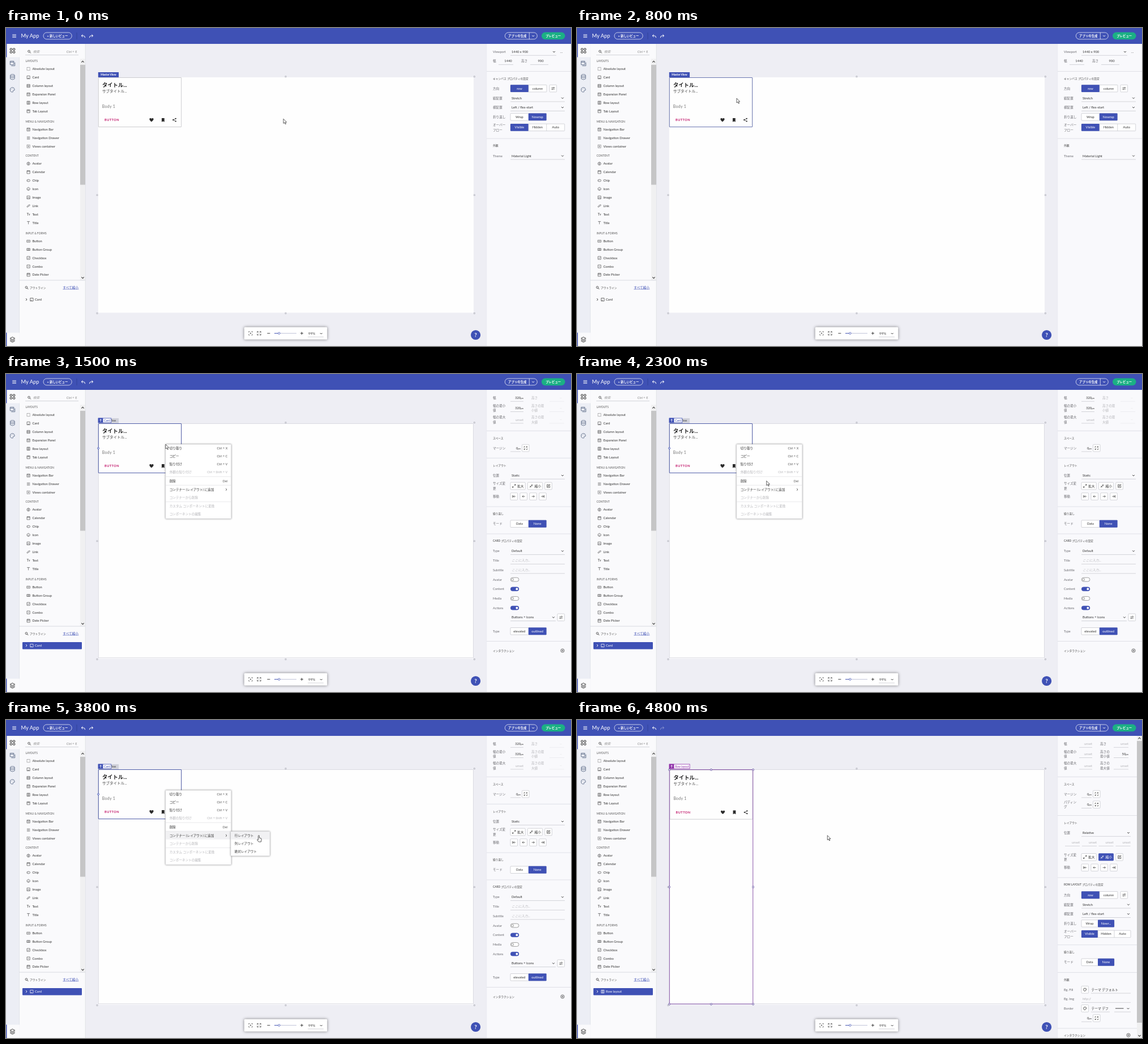
Recreate the animation shown at these times as an HTML page. Size 998x561 px, loop 6.1 s.

```html
<!DOCTYPE html>
<html lang="ja">
<head>
<meta charset="utf-8">
<title>App builder</title>
<style>
html, body { margin: 0; width: 100%; height: 100%; overflow: hidden; background: #eeeef4; }
svg { display: block; width: 998px; height: 561px; }
text { font-family: Lato, "Noto Sans CJK JP", "Noto Sans CJK", sans-serif; white-space: pre; }
.shadow { filter: drop-shadow(0 .6px 1.4px rgba(0, 0, 0, .42)); }
.shadow.wide { filter: drop-shadow(0 .8px 2.4px rgba(0, 0, 0, .5)); }
</style>
</head>
<body>
<svg id="stage" viewBox="0 0 998 561"></svg>
<script>
const LOOP = 6100;
const BLUE = '#3f51b5', INK = '#333', LABEL = '#6b6b70', PALE = '#b4b4b8', LINE = '#b9bac2';
const PURPLE = '#9031aa', FRAME_BLUE = '#4453a6', FRAME_PURPLE = '#7b419f';
const ROUND = 'M3 .3a2.7 2.7 0 1 1-.01 0z', BOX = 'M.4.4h5.2v5.2H.4z';

// Drawing helpers, all returning SVG markup
const text = (x, y, s, fill = INK, size = 5.75, more = '') =>
  `<text x="${x}" y="${y + size * .36}" fill="${fill}" font-size="${size}" ${more}>${s}</text>`;
const mid = (x, y, s, fill, size, more = '') => text(x, y, s, fill, size, 'text-anchor="middle" ' + more);
const end = (x, y, s, fill, size, more = '') => text(x, y, s, fill, size, 'text-anchor="end" ' + more);
const rect = (x, y, w, h, fill = 'none', stroke = 'none', r = 0, sw = .7) =>
  `<rect x="${x}" y="${y}" width="${w}" height="${h}" fill="${fill}" stroke="${stroke}" stroke-width="${sw}" rx="${r}"/>`;
const dot = (x, y, r, fill, stroke = 'none', sw = .8) =>
  `<circle cx="${x}" cy="${y}" r="${r}" fill="${fill}" stroke="${stroke}" stroke-width="${sw}"/>`;
const path = (d, stroke = INK, sw = .7, fill = 'none', dash = 'none') =>
  `<path d="${d}" fill="${fill}" stroke="${stroke}" stroke-width="${sw}" stroke-dasharray="${dash}"/>`;
const at = (x, y, s) => `<g transform="translate(${x} ${y})">${s}</g>`;
const hline = (x1, x2, y, c = LINE, sw = .6) => path(`M${x1} ${y}H${x2}`, c, sw);
const chevron = (x, y, c = INK) => path(`M${x - 1.9} ${y - 1}l1.9 2 1.9-2`, c, .9);
const caret = (x, y, up) => path(`M${x - 2.2} ${y + 1.2 * up}l2.2 ${-2.4 * up} 2.2 ${2.4 * up}`, '#444', 1.1);
const bold = 'font-weight="700"', medium = 'font-weight="500"', italic = 'font-style="italic"';

const magnifier = (x, y) => dot(x - .5, y - .5, 1.8, 'none', INK, .8) + path(`M${x + .8} ${y + .8}l2 2`, INK, 1);
const rule = y => hline(849, 998, y, '#d9dae1', .8);
const heading = (y, s) => text(860, y, s, '#444', 4.75, medium);
const lines = (x, y, rows, c = LABEL) =>
  rows.map((s, i) => text(x, y + (i - (rows.length - 1) / 2) * 8.5, s, c, 5.6)).join('');
const label = (y, ...rows) => lines(860, y, rows);
const select = (y, s, x2 = 987, x1 = 891) => text(x1 + 2, y, s) + chevron(x2 - 4, y) + hline(x1, x2, y + 6.3);
const hint = (y, s, x2 = 987) => text(893, y, s, PALE, 5.75, italic) + hline(891, x2, y + 6.3);
const segments = (y, w, active, ...names) => rect(891, y - 6.2, w * names.length, 12.5, '#fff', LINE, 1, .6) +
  names.map((s, i) => {
    const on = i === active, x = 891 + i * w;
    return (on ? rect(x, y - 6.4, w, 12.9, BLUE, 'none', 1) : i ? path(`M${x} ${y - 6.2}v12.5`, LINE, .6) : '') +
      mid(x + w / 2, y, s, on ? '#fff' : INK);
  }).join('');
const button = (x, y, icon, w = 12.6, on = false, s = '') =>
  rect(x, y - 6.3, w, 12.6, on ? BLUE : '#fff', on ? BLUE : LINE, 1.2, .6) +
  at(x + 6.3, y, path(icon, on ? '#fff' : INK, .75)) + text(x + 12, y, s, on ? '#fff' : INK);
const toggle = (y, on) => rect(891.3, y - 3.4, 14.6, 6.8, on ? BLUE : '#fff', on ? BLUE : '#777', 3.4) +
  (on ? dot(902.4, y, 2, '#fff') : dot(894.8, y, 1.9, '#fff', '#777', .7));
const value = (x, y, s, w = 23) => (s === 'unset' ? end(x, y, s, PALE)
  : end(x, y, `${s}<tspan font-size="4.6">px</tspan>`)) + hline(x - w, x, y + 6.3);

const SWAP = 'M-2.7-1.2h5.2l-1.5-1.5M2.7 1.2h-5.2l1.5 1.5';
const UNLINK = 'M-1-2.6h-1.6v1.8M1 2.6h1.6V.8M-2.6 2.6l1.8-1.8M2.6-2.6L.8-.8M-2.6 1v1.6h1.6M1-2.6h1.6v1.6';
const EDIT = 'M.4-2.4h-2.8v5h5V0M-.8.9l.2-1.2 2.8-2.6.8.9L.2.7z';
const GROW = 'M.8-2.6h1.9v1.9M2.6-2.6L.5-.5M-.8 2.6h-1.9V.7M-2.6 2.6l2.1-2.1';
const SHRINK = 'M.5-2.4v1.9h1.9M.5-.5l2.2-2.2M-.5 2.4V.5h-1.9M-.5.5l-2.2 2.2';
const PALETTE = 'M0-2.7a2.7 2.7 0 1 0 0 5.4q1 0 .7-1t.7-1.1h1q.4-3.3-2.4-3.3M-1.4-.6h.4M.3-1.5h.4';
const MOVES = ['M-2.6-2.2v4.4M2.6 0h-4M.2-1.7L-1.5 0 .2 1.7', 'M2.4 0h-4.6M-.5-1.7L-2.2 0l1.7 1.7',
  'M-2.4 0h4.6M.5-1.7L2.2 0 .5 1.7', 'M2.6-2.2v4.4M-2.6 0h4M-.2-1.7L1.5 0l-1.7 1.7'];
const moves = y => label(y, '移動') + MOVES.map((d, i) => button(891 + i * 16.9, y, d)).join('');
const sizing = (y, shrunk) => label(y, 'サイズ変', '更') + button(891, y, GROW, 26.3, false, '拡大') +
  button(921.4, y, SHRINK, 26.3, shrunk, '縮小') + button(951.8, y, EDIT);
const adder = (x, y) => dot(x, y, 3.1, 'none', INK, .7) + path(`M${x - 1.7} ${y}h3.4m-1.7-1.7v3.4`);

// Toolbox: name, y, icon, dash
const ROWBOX = BOX + 'M2.2.4v5.2M3.8.4v5.2';
const tools = [
  ['LAYOUTS', 58.5],
  ['Absolute layout', 72, BOX, '.9 .7'], ['Card', 87, BOX + 'M1.5 4.4h3'],
  ['Column layout', 102, BOX + 'M.4 2.2h5.2M.4 3.8h5.2'], ['Expansion Panel', 117, BOX + 'M.4 2h5.2M2 3.4l1 1 1-1'],
  ['Row layout', 131.7, ROWBOX], ['Tab Layout', 146.7, BOX + 'M.4 2.2h5.2M3 .4v1.8'],
  ['MENU &amp; NAVIGATION', 165.5],
  ['Navigation Bar', 179, BOX + 'M.4 1.9h5.2M2 3.8h2.4'], ['Navigation Drawer', 194, 'M.3 1h5.4M.3 3h5.4M.3 5h5.4'],
  ['Views container', 208.7, BOX + 'M1.6 3h2.8M3 1.6v2.8', '1.2 .5'],
  ['CONTENT', 225.7],
  ['Avatar', 239.2, ROUND + 'M3 1.5a.9.9 0 1 1-.01 0M1.3 4.8q1.7-1.6 3.4 0'], ['Calendar', 254.2, BOX + 'M.4 1.8h5.2M1.8 0v1M4.2 0v1'],
  ['Chip', 269, 'M2 1.2h2a1.8 1.8 0 0 1 0 3.6H2a1.8 1.8 0 0 1 0-3.6M1.5 3h1.2'], ['Icon', 283.8, ROUND + 'M1.6 3.5q1.4 1.8 2.8 0M2 2.1v.5M4 2.1v.5'],
  ['Image', 298.8, BOX + 'M.9 4.6l1.4-1.8 1 1.1.8-.9 1.1 1.6'],
  ['Link', 313.7, 'M2.7 3.8L1.9 4.9Q1 5.6.5 4.9q-.5-.8.4-1.5l1.3-1.2q.8-.6 1.4.2M3.3 2.2L4.1 1.1Q5 .4 5.5 1.1q.5.8-.4 1.5L3.8 3.8q-.8.6-1.4-.2'],
  ['Text', 328.6, 'M.2 1h3.2M1.8 1v4.2M3.6 2.7h2.2M4.7 2.7v2.5'], ['Title', 343.6, 'M.5.7h5M3 .7v4.8'],
  ['INPUT &amp; FORMS', 362.5],
  ['Button', 376, 'M.2 1.2h5.6v3.6H.2zM1.7 3h2.6'], ['Button Group', 390.6, 'M.2 1.2h5.6v3.6H.2zM2.2 1.2v3.6M4 1.2v3.6'],
  ['Checkbox', 405.5, BOX + 'M1.5 3l1.1 1.1 2-2.2'], ['Combo', 420.5, BOX + 'M2 2.5l1 1 1-1'],
  ['Date Picker', 435.3, BOX + 'M.4 1.9h5.2M1.8 0v1M4.2 0v1M1.8 3.6h1.2']
].map(([s, y, d, dash]) => d ? at(36.6, y - 2.9, path(d, '#444', .65, 'none', dash)) + text(46.4, y, s)
  : text(34.5, y, s, '#555', 4.9)).join('');

const sidebar = rect(0, 28, 23.5, 533, '#eceef5') + rect(23.5, 28, 116.5, 533, '#fafafc') +
  rect(0, 28, 23.5, 23.5, '#fafafc') + rect(0, 28, 1.4, 23.5, BLUE) +
  rect(0, 537.5, 23.5, 23.5, '#fafafc') + rect(0, 537.5, 1.4, 23.5, BLUE) +
  path('M23.5 51.5v486M140.2 28v533', '#d6d8e0', .6) +
  at(11.5, 40, [[-2.6, -2.4], [2.6, -2.4], [-2.6, 2.6], [2.6, 2.6]].map(([x, y]) => rect(x - 1.6, y - 1.6, 3.2, 3.2, 'none', '#222', .8, 1)).join('')) +
  path('M7.3 58.5h6.5v6.3H7.3zM9.3 66.7h6.4v-6M7.3 60.4h6.5', '#5c6a86', .9) +
  path('M7.6 83.4a3.8 1.6 0 1 1 7.6 0a3.8 1.6 0 1 1-7.6 0v6.2q3.8 3 7.6 0v-6.2M7.6 86.5q3.8 3 7.6 0', '#5c6a86', .9) +
  at(11.4, 109, `<g transform="scale(1.5)">${path(PALETTE, '#5c6a86', .6)}</g>`) +
  path('M11.4 545.2l4.3 2.3-4.3 2.3-4.3-2.3zM7.1 549.8l4.3 2.3 4.3-2.3M7.1 552l4.3 2.3 4.3-2.3', '#222', .9) +
  magnifier(41, 41.6) + text(47.8, 42, '検索', '#999', 5.75, italic) + end(125.5, 42, 'Ctrl + E', '#888') +
  hline(34, 128, 47.6) + tools +
  rect(131, 54.5, 9, 390.5, '#f0f0f1') + rect(131, 65, 9, 211.5, '#c5c5c6') + caret(135.5, 59.5, 1) + caret(135.5, 440.5, -1) +
  hline(23.5, 140, 445, '#d0d2da', .8) +
  magnifier(36.4, 458) + text(42, 458.4, 'アウトライン', '#444', 4.75, medium) +
  text(100.3, 457.6, 'すべて縮小', BLUE, 5.65) + hline(100.3, 128.5, 460.8, BLUE);

const header = rect(0, 0, 998, 28, BLUE) + path('M11.2 11.8h6.8M11.2 14.1h6.8M11.2 16.4h6.8', '#fff', .9) +
  text(26.6, 14, 'My App', '#fff', 9.3) + rect(66, 8, 50.2, 11.8, 'none', '#fff', 5.9) +
  mid(91, 14, '+ 新しいビュー', '#fff', 5.4, bold) + path('M125 8v12', '#2f3f95', .8) +
  path('M135.6 11.5l-2.4 2.2 2.4 2.2M133.4 13.7h3.4q2.6 0 2.8 3.5', '#fff', 1) +
  rect(881.3, 8, 57, 11.8, 'none', '#fff', 5.9) + path('M924.3 8v12', '#fff', .7) + chevron(931.2, 14, '#fff') +
  mid(903.3, 14, 'アプリの生成', '#fff', 5.4, bold) + rect(946, 7.6, 41.5, 12.6, '#1bb084', 'none', 6.3) +
  mid(966.7, 14, 'プレビュー', '#fff', 5.4, bold);
const redo = c => path('M151.4 11.5l2.4 2.2-2.4 2.2M153.6 13.7h-3.4q-2.6 0-2.8 3.5', c, 1);

const canvas = rect(162.8, 87, 663.2, 415.3, '#fefefe') +
  [[494, 85.8], [827.5, 85.8], [161, 294.8], [827.5, 294.8], [161, 503.2], [494, 503.2], [827.5, 503.2]]
    .map(([x, y]) => rect(x - 1, y - 1, 2, 2, '#fff', '#9a9ca8', 0, .6)).join('');

const toolbar = `<g class="shadow wide">${rect(420.8, 527.8, 146.5, 21.8, '#fff', 'none', 1.5)}</g>` +
  at(432, 538.6, path('M-3.2-1.5v-1.7h1.7M1.5-3.2h1.7v1.7M3.2 1.5v1.7H1.5M-1.5 3.2h-1.7V1.5M-1.3 0h2.6M0-1.3v2.6', '#444')) +
  at(447, 538.6, path('M-3.2-.9v-2.3h2.3M.9-3.2h2.3v2.3M3.2.9v2.3H.9M-.9 3.2h-2.3V.9M-3-3l2 2M3-3l-2 2M3 3L1 1M-3 3l2-2', '#444')) +
  path('M461.4 538.6h5M520 538.6h5M522.5 536.1v5', INK, .9) + hline(474, 513, 538.6, '#b9bdd4', .9) +
  hline(474, 481, 538.6, BLUE, .9) + dot(482.4, 538.6, 1.7, '#fff', BLUE) +
  text(534, 538.8, '99%', INK, 6.3) + hline(533, 561, 545) + chevron(556.7, 539) +
  dot(829.6, 541.5, 8.6, BLUE) + mid(829.6, 541.5, '?', '#fff', 10, bold);

const card = text(170, 101, 'タイトル...', '#222', 9.3, bold) + text(170, 111.7, 'サブタイトル...', '#444', 6.5) +
  text(169.8, 138, 'Body 1', '#777', 7, 'letter-spacing=".25"') +
  text(174, 162.4, 'BUTTON', '#c2186b', 5.6, 'font-weight="700" letter-spacing=".45"') +
  at(257, 162.2, path('M0 3.3C-5.4-.9-3.6-3.1-1.9-3.1Q-.6-3.1 0-1.9Q.6-3.1 1.9-3.1C3.6-3.1 5.4-.9 0 3.3z', 'none', 0, '#2c2c2c')) +
  path('M275 159h4.8v6.7l-2.4-1.2-2.4 1.2z', 'none', 0, '#2c2c2c') +
  at(297.5, 162.2, path('M2.3-2.4L-2.3 0l4.6 2.4', '#2c2c2c', .8) + dot(2.3, -2.4, 1.1, '#2c2c2c') + dot(-2.3, 0, 1.1, '#2c2c2c') + dot(2.3, 2.4, 1.1, '#2c2c2c'));
const cardEdge = (stroke, sw = .7) => rect(163.3, 87.5, 146.4, 87, 'none', stroke, .5, sw);
const handle = (x, y, c) => dot(x, y, 1.5, '#fff', c, .9);
const viewTag = (fill, ink, more) => rect(162.8, 78, 36.3, 9, fill) + mid(180.9, 82.7, 'Master View', ink, 4.9, more);
const tag = (s, w, c) => rect(163.1, 78, w, 7.8, '#fff', c, 0, .8) + rect(162.8, 77.7, 8.6, 8.4, c) +
  path('M167.1 84.2v-4.4M165.5 81.3l1.6-1.6 1.6 1.6', '#fff', .9) + text(173.3, 82, s, c, 5);
const outline = (s, icon, on) => {
  const c = on ? '#fff' : INK;
  return (on ? rect(29, 472.9, 105, 12.7, BLUE, 'none', 1) : '') + path('M35 477l2 2-2 2', c, .9) +
    at(42.4, 476.1, path(icon, c, .7)) + text(51, 479.2, s, c);
};
const CARDBOX = BOX + 'M1.5 4.4h1.4';

// Property panels
const panel = s => rect(848.6, 28, 149.4, 533, '#f9f9fc') + path('M848.6 28v533', '#e0e1e8', .5) + s;
const flexRows = (y, x2, w2, w3, nowrap) => label(y, '方向') + segments(y, 32, 0, 'row', 'column') + button(960, y, SWAP) +
  label(y + 17, '縦配置') + select(y + 17, 'Stretch', x2) + label(y + 33.5, '横配置') + select(y + 33.5, 'Left / flex-start', x2) +
  label(y + 50.2, '折り返し') + segments(y + 50.2, w2, 1, 'Wrap', nowrap) +
  label(y + 68.7, 'オーバー', 'フロー') + segments(y + 68.7, w3, 0, 'Visible', 'Hidden', 'Auto');
const sizeYs = [42, 60.2, 80.6];
const sizeRows = [['幅'], ['幅の最小', '値'], ['幅の最大', '値']].map((rows, i) => label(sizeYs[i], ...rows)).join('');
const heights = (x, c, ...cells) => cells.map((rows, i) => lines(x, sizeYs[i], rows, c)).join('');

const rootPanel = panel(label(42, 'Viewport') + select(42, '1440 x 900', 972) + mid(981, 41, '...', '#888', 7) +
  label(58.3, '幅') + mid(887, 58.3, '1440') + hline(870, 896, 64.6) + text(910, 58.3, '高さ', LABEL, 5.6) + mid(944.5, 58.3, '900') +
  hline(926, 958, 64.6) + rule(76.5) + heading(89.3, 'キャンバス プロパティの設定') +
  flexRows(106.6, 987, 31.8, 31.9, 'Nowrap') + rule(195) + heading(207.7, '外観') + label(225.6, 'Theme') + select(225.6, 'Material Light'));

const cardPanel = panel(sizeRows + value(914, 42, '320') + value(914, 60.2, '320') + value(914, 80.6, 'unset') +
  heights(928, PALE, ['高さ'], ['高さの最', '小値'], ['高さの最', '大値']) +
  sizeYs.map(y => end(982, y, '—', '#ddd', 5) + hline(960, 986, y + 6.3, '#e4e4ea')).join('') +
  rule(100.3) + heading(113, 'スペース') + label(130.6, 'マージン') + value(909, 130.6, '0', 18) + button(911.5, 130.6, UNLINK) +
  rule(148.3) + heading(161, 'レイアウト') + label(179, '位置') + select(179, 'Static') + sizing(197.5, false) + moves(216) +
  rule(234) + heading(246.7, '繰り返し') + label(264.2, 'モード') + segments(264.2, 31.8, 1, 'Data', 'None') +
  rule(282) + heading(294.5, 'CARD プロパティの設定') + label(312.3, 'Type') + select(312.3, 'Default') +
  label(329, 'Title') + hint(329, 'ここに入力...') + label(345.6, 'Subtitle') + hint(345.6, 'ここに入力...') +
  ['Avatar', 'Content', 'Media', 'Actions'].map((s, i) => label(362.6 + i * 16.7, s) + toggle(362.6 + i * 16.7, i % 2)).join('') +
  select(429.3, 'Buttons + Icons', 971) + button(974, 429.3, SWAP) + label(453.7, 'Type') + segments(453.7, 31.8, 1, 'elevated', 'outlined') +
  rule(471.5) + heading(488, 'インタラクション') + adder(983, 488));

const rowPanel = panel(sizeRows + sizeYs.map((y, i) => value(910, y, 'unset') + value(974, y, i === 1 ? '50' : 'unset', 26)).join('') +
  heights(924, LABEL, ['高さ'], ['高さの', '最小値'], ['高さの', '最大値']) +
  rule(100.3) + heading(113, 'スペース') + label(130.6, 'マージン') + label(149.2, 'パディン', 'グ') +
  [130.6, 149.2, 526].map(y => value(909, y, '0', 18) + button(911.5, y, UNLINK)).join('') +
  rule(168.5) + heading(181.6, 'レイアウト') + label(199, '位置') + select(199, 'Relative', 978) +
  [888, 918, 947.5, 977.5].map(x => value(x, 216, 'unset', 26)).join('') + sizing(241.8, true) + moves(260.3) +
  rule(278) + heading(290.7, 'ROW LAYOUT プロパティの設定') + flexRows(308.7, 978, 29, 29, 'Nowr...') +
  rule(396.7) + heading(409.6, '繰り返し') + label(427.2, 'モード') + segments(427.2, 29, 1, 'Data', 'None') +
  rule(445.4) + heading(458, '外観') + label(475.7, 'Bg. Fill') + button(891, 475.7, PALETTE) + text(908.5, 475.7, 'テーマ デフォルト') + hline(908, 978, 482) +
  label(492, 'Bg. Img') + hint(492, 'http://', 978) + label(508.8, 'Border') + button(891, 508.8, PALETTE) + text(908.5, 508.8, 'テーマ デフ') +
  hline(908, 941, 515) + hline(951, 965.5, 508.8, INK, .9) + chevron(973.5, 509) + hline(949, 978, 515) +
  rule(544) + heading(556, 'インタラクション') + adder(974, 556) +
  rect(989, 28, 9, 533, '#f0f0f1') + rect(989, 37, 9, 497, '#c5c5c6') + caret(993.5, 32.3, 1) + caret(993.5, 557, -1));

// Context menus
const menuText = (x, y, s, off) => text(x, y, s, off ? PALE : INK, 5.6);
const popup = (x, y, w, h) => `<g class="shadow">${rect(x, y, w, h, '#fff', '#c9c9cf', .8, .5)}</g>`;
const menu = [[131.2, '切り取り', 'Ctrl + X'], [145.2, 'コピー', 'Ctrl + C'], [159.3, '貼り付け', 'Ctrl + V'],
  [173.3, '外観の貼り付け', 'Ctrl + Shift + V', 1], [188.6, '削除', 'Del'], [203.7, 'コンテナー (レイアウト) に追加', ''],
  [217.6, 'コンテナーから削除', '', 1], [233.1, 'カスタム コンポーネントに変換', '', 1], [247.1, 'コンポーネントの編集', '', 1]]
  .map(([y, s, key, off]) => menuText(288.7, y, s, off) + end(391.3, y, key, off ? PALE : '#555', 5.6)).join('') +
  [181, 196.2, 225.4].map(y => hline(282, 397.5, y, '#d8d8dd')).join('') + path('M388.2 202l1.8 1.8-1.8 1.8', INK, .9);
const subItems = ['行レイアウト', '列レイアウト', '絶対レイアウト'].map((s, i) => menuText(403.8, 203.7 + i * 14, s)).join('');

// Layers appear only inside their [from, to) spans
const stage = document.getElementById('stage');
const layers = [];
let markup = '';
const layer = (s, ...spans) => { layers.push(spans); markup += `<g class="layer">${s}</g>`; };

layer(canvas + header + sidebar + toolbar, 0, LOOP);
layer(redo('#fff'), 0, 4500);
layer(redo('#8792d0'), 4500, LOOP);
layer(rect(163.2, 87.7, 662.2, 413.1, 'none', '#c3c4cf', 0, .6), 1500, 4500, 4600, LOOP);
layer(viewTag(BLUE, '#fff', bold), 0, 1400);
layer(viewTag('#d0d1da', '#444'), 1400, 4600);
layer(card + cardEdge('#b8b8bc'), 0, 4500);
layer(cardEdge(FRAME_BLUE), 600, 1500);
layer(cardEdge(FRAME_BLUE, .9) + tag('Card', 22.6, BLUE) + handle(163.1, 131, BLUE), 1500, 4500);
layer(at(.6, .6, card + cardEdge('#b8b8bc')), 4500, LOOP);
layer(rect(163.3, 87.6, 147.2, 413, 'none', '#a9a9b0', 0, .8), 4500, 4600);
layer(tag('Row layout', 36, PURPLE) + rect(163.3, 87.6, 147.5, 413.4, 'none', FRAME_PURPLE, 0, .9) +
  [163.1, 237, 311.1].map(x => [87.7, 294.6, 501.3].map(y => x === 237 && y === 294.6 ? '' : handle(x, y, '#5d4a9c')).join('')).join(''), 4600, LOOP);
layer(outline('Card', CARDBOX, false), 0, 1400);
layer(outline('Card', CARDBOX, true), 1400, 4500);
layer(outline('Row layout', ROWBOX, true), 4500, LOOP);
layer(rootPanel, 0, 1500, 4500, 4600);
layer(cardPanel, 1500, 4500);
layer(rowPanel, 4600, LOOP);
layer(popup(281.8, 124, 116, 131.2), 1500, 4500);
layer(rect(282, 196.6, 115.6, 14, '#f1f1f3'), 2600, 4500);
layer(menu, 1500, 4500);
layer(popup(397, 196.8, 69, 43), 2600, 4500);
layer(rect(397.3, 197.1, 68.4, 13.6, '#f1f1f3'), 3600, 4500);
layer(subItems, 2600, 4500);
layer(at(443, 203, path('M2.6 7.2V1.5a.95.95 0 0 1 1.9 0V5l3 .8q.9.3.7 1.4l-.7 4.8H3.3L.5 8.4q.7-1.3 2.1 0z', '#222', .75, '#fff')), 3800, 4500);
layer(`<g id="arrow">${path('M0 0v8l1.9-1.6 1.4 3 1.3-.6-1.4-2.9h2.5z', '#222', .7, '#fff')}</g>`, 0, 3800, 4500, LOOP);

stage.innerHTML = markup;
const groups = [...stage.querySelectorAll('.layer')];
const arrow = document.getElementById('arrow');

// Pointer stops: time, x, y
const stops = [[0, 490, 160.3], [700, 282, 124], [1800, 282, 124], [2500, 347, 203.5], [2900, 352, 205],
  [3200, 352, 205], [3600, 442.3, 203.6], [LOOP, 442.3, 203.6]];
const ease = p => (1 - Math.cos(Math.PI * p)) / 2;

function pointer(t) {
  const i = stops.findIndex(s => s[0] > t);
  const [t0, x0, y0] = stops[i - 1], [t1, x1, y1] = stops[i];
  const p = ease((t - t0) / (t1 - t0));
  return [x0 + (x1 - x0) * p, y0 + (y1 - y0) * p];
}

const start = performance.now();
function draw() {
  // Everything moves in steps of a tenth of a second
  const t = Math.floor((performance.now() - start) % LOOP / 100) * 100;
  groups.forEach((g, i) => {
    const on = layers[i].some((from, k) => k % 2 === 0 && t >= from && t < layers[i][k + 1]);
    g.style.display = on ? '' : 'none';
  });
  arrow.setAttribute('transform', `translate(${pointer(t)})`);
  requestAnimationFrame(draw);
}
draw();
</script>
</body>
</html>
```
